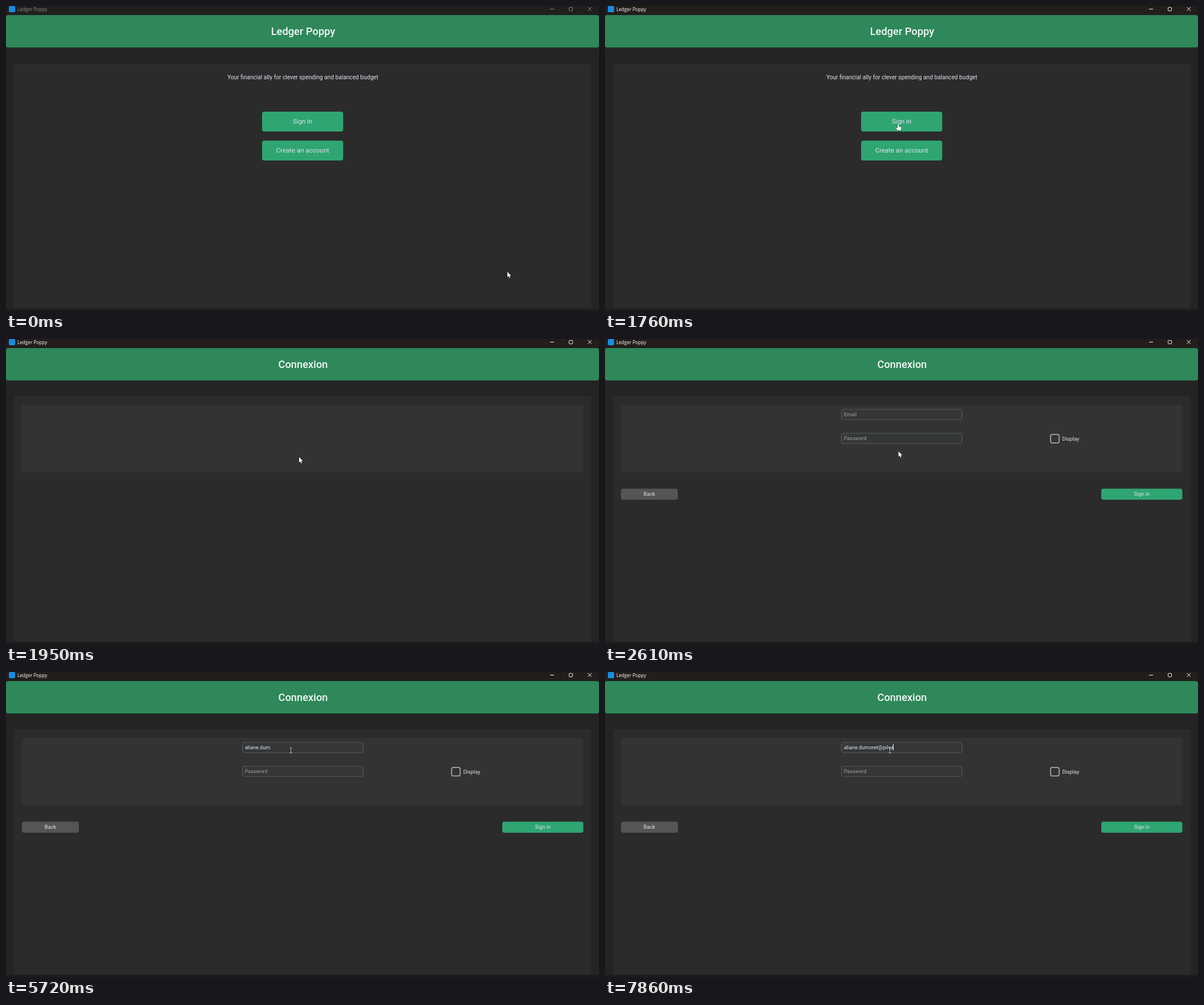
Animation of 1042x537 px, one loop 8 s. Source, as an HTML page with a canvas:

```html
<!DOCTYPE html>
<html lang="en">
<head>
<meta charset="utf-8">
<title>Ledger Poppy</title>
<style>
  html, body { margin: 0; width: 100%; height: 100%; overflow: hidden; background: #242424; }
  canvas { display: block; }
</style>
</head>
<body>
<canvas id="stage" width="1042" height="537"></canvas>
<script>
const ctx = document.getElementById('stage').getContext('2d');
const LOOP = 8000;
const APP = 'Ledger Poppy';
const EMAIL = 'aliane.dumoret@pilva';
const GREEN = '#2fa572', HOVER = '#106a43', TEXT = '#dce4ee', HINT = '#9e9e9e';

// Moments at which each character of the address is typed
const KEYS = [4040, 4170, 4390, 4500, 4610, 4720, 4980, 5370, 5570, 5640,
              5840, 6100, 6200, 6310, 6970, 7300, 7390, 7480, 7710, 7860];
// The caret toggles on and off at these moments
const BLINKS = [3320, 3910, 4170, 4830, 5100, 5720, 5990, 6640, 6900, 7570, 7860];

const SIGN_IN = [450, 186, 142.5, 35];
const CREATE = [450, 237, 142.5, 35];
const EMAIL_BOX = [415, 123.5, 213, 19];
const PASSWORD_BOX = [415, 165.5, 213, 19];

const passed = (times, t) => times.filter(time => t >= time).length;
const inside = (p, [x, y, w, h]) => p.x >= x && p.x <= x + w && p.y >= y && p.y <= y + h;

function box([x, y, w, h], radius, fill, stroke, weight = 1) {
  ctx.beginPath();
  ctx.roundRect(x, y, w, h, radius);
  if (fill) { ctx.fillStyle = fill; ctx.fill(); }
  if (stroke) { ctx.strokeStyle = stroke; ctx.lineWidth = weight; ctx.stroke(); }
}

function label(text, x, y, size, color = TEXT, align = 'left', font = 'Roboto', weight = 400) {
  ctx.font = `${weight} ${size}px ${font}, sans-serif`;
  ctx.textAlign = align;
  ctx.fillStyle = color;
  ctx.fillText(text, x, y);
}

function button(rect, text, size, fill) {
  const [x, y, w, h] = rect;
  box(rect, 4, fill);
  label(text, x + w / 2, y + h / 2 + size * 0.34, size, TEXT, 'center');
}

function entry(rect, text, color) {
  const [x, y, w, h] = rect;
  box([x + 0.5, y + 0.5, w - 1, h - 1], 4, '#343638', '#565b5e', 1.2);
  label(text, x + 4.7, y + 12.5, 9.05, color);
}

function titleBar(active) {
  const color = active ? '#ffffff' : '#8c8a8a';
  ctx.fillStyle = active ? '#231d1b' : '#211e1e';
  ctx.fillRect(0, 0, 1042, 15.5);
  ctx.fillStyle = '#201c1c';
  ctx.fillRect(0, 533, 1042, 4);
  box([5, 0, 11, 11], 2, '#168de2');
  label(APP, 20, 9, 8.2, color, 'left', '"Open Sans"');
  ctx.strokeStyle = color;
  ctx.lineWidth = 1;
  ctx.beginPath();
  ctx.moveTo(956, 5.5); ctx.lineTo(963, 5.5);
  ctx.moveTo(1022.5, 2); ctx.lineTo(1029, 8.5);
  ctx.moveTo(1029, 2); ctx.lineTo(1022.5, 8.5);
  ctx.stroke();
  box([989.5, 2.5, 6, 6], 1, null, color);
}

function page(title) {
  box([0, 16, 1042, 57], 4, '#2e885a');
  label(title, 522, 51, 18.3, '#f4f8f6', 'center', 'Roboto', 500);
  box([14, 101, 1014.5, 432], [4, 4, 0, 0], '#2b2b2b');
}

function welcome(t, pointer) {
  page(APP);
  label('Your financial ally for clever spending and balanced budget', 521.5, 129, 10.18, TEXT, 'center');
  const pressed = t >= 1760 && t < 1820;
  const fill = rect => inside(pointer, rect) && !pressed ? HOVER : GREEN;
  button(SIGN_IN, 'Sign in', 11.5, fill(SIGN_IN));
  button(CREATE, 'Create an account', 11.5, fill(CREATE));
}

function login(t) {
  page('Connexion');
  box([28, 116, 986.5, 118.5], 3, '#333333');
  if (t < 2030) return;
  const typed = EMAIL.slice(0, passed(KEYS, t));
  const focused = t >= 3320;
  entry(EMAIL_BOX, focused ? typed : 'Email', focused ? TEXT : HINT);
  if (passed(BLINKS, t) % 2) {
    const end = 419.7 + ctx.measureText(typed).width;
    ctx.fillStyle = '#ffffff';
    ctx.fillRect(Math.round(end - 0.5), 127, 1, 11);
  }
  entry(PASSWORD_BOX, 'Password', HINT);
  box([783, 168, 15, 15], 3, null, '#949a9f', 2);
  label('Display', 803.5, 178.5, 9.25);
  button([28, 263.5, 100, 19.5], 'Back', 9.25, '#555555');
  button([872, 263.5, 142.5, 19.5], 'Sign in', 9.25, GREEN);
}

// The pointer moves in discrete steps along two eased paths
function pointerAt(t) {
  if (t < 2610) {
    const rest = 1 - Math.min(Math.floor(t / 66), 11) / 11;
    const p = 1 - rest ** 2;
    return { x: 881 - 366 * p, y: 468 - 260 * p };
  }
  const rest = 1 - Math.min(Math.floor((t - 2610) / 71) + 1, 9) / 9;
  const p = 1 - rest ** 1.35;
  return { x: 516 - 15.5 * p * p, y: 208 - 70 * p };
}

const ARROW = new Path2D('M0 0V9.6L2.2 7.6L3.8 11L5.2 10.4L3.7 7.1H6.7Z');
const HAND = new Path2D('M-1 0.5Q0 -0.8 1 0.5V4L5 5Q6 5.4 5.6 7L5 11H-1L-4 7Q-3.6 5.6 -1 7Z');

function drawPointer({ x, y }, shape) {
  ctx.save();
  ctx.translate(x, y);
  if (shape === 'beam') {
    ctx.strokeStyle = '#c8c8c8';
    ctx.lineWidth = 0.9;
    ctx.stroke(new Path2D('M-2 -4.5H2M0 -4.5V4.5M-2 4.5H2'));
  } else {
    const path = shape === 'hand' ? HAND : ARROW;
    ctx.strokeStyle = '#111111';
    ctx.lineWidth = 1;
    ctx.stroke(path);
    ctx.fillStyle = '#ffffff';
    ctx.fill(path);
  }
  ctx.restore();
}

function render(t) {
  const pointer = pointerAt(t);
  const over = (...rects) => rects.some(rect => inside(pointer, rect));
  let shape = 'arrow';
  ctx.fillStyle = '#242424';
  ctx.fillRect(0, 0, 1042, 537);
  if (t < 1880) {
    welcome(t, pointer);
    if (over(SIGN_IN, CREATE)) shape = 'hand';
  } else if (t >= 1950) {
    login(t);
    if (over(EMAIL_BOX, PASSWORD_BOX)) shape = 'beam';
  }
  titleBar(t >= 1760);
  drawPointer(pointer, shape);
}

function tick() {
  render(performance.now() % LOOP);
  requestAnimationFrame(tick);
}
tick();
</script>
</body>
</html>
```
